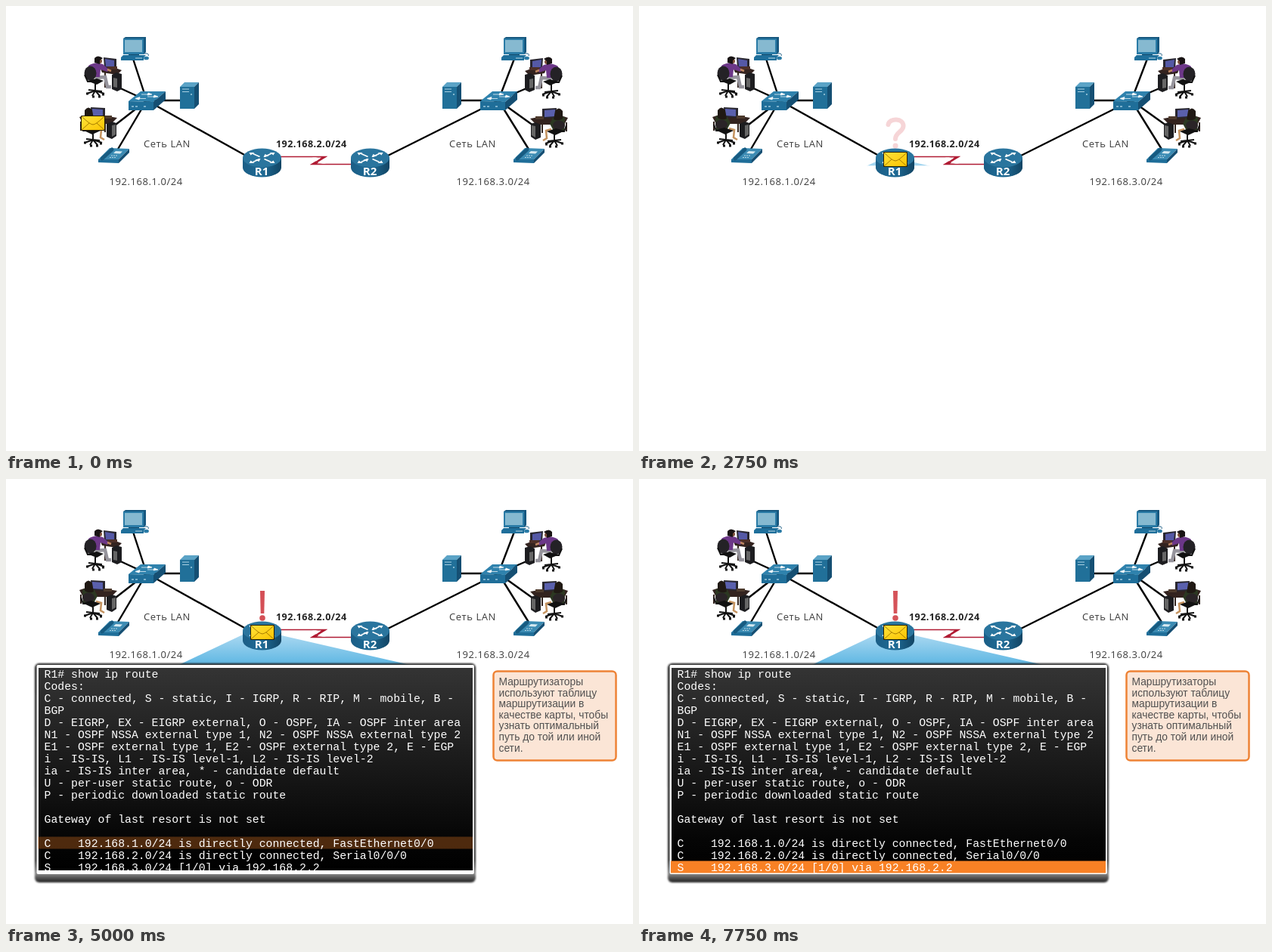
Recreate the animation shown at these times as an HTML page. Size 829x589 px, loop 8000 ms.

```html
<!DOCTYPE html>
<html lang="ru">
<head>
<meta charset="utf-8">
<title>Таблица маршрутизации</title>
<style>
  html, body { margin: 0; width: 100%; height: 100%; overflow: hidden; background: #fff; }
  svg { display: block; width: 829px; height: 589px; }
  .label { font: 13px "Open Sans", sans-serif; letter-spacing: .55px; fill: #3c3c3c; }
  .strong { font-weight: 700; font-size: 12.5px; letter-spacing: .45px; fill: #222; }
  .name { font: 700 15px "Open Sans", sans-serif; fill: #fff; text-anchor: middle; }
  .mono { font: 14.8px "Liberation Mono", monospace; fill: #fff; white-space: pre; }
  .note { font: 13.8px "Liberation Sans", sans-serif; fill: #505050; }
  .wire { stroke: #000; stroke-width: 2.4; fill: none; }
</style>
</head>
<body>
<svg viewBox="0 0 829 589">
  <defs>
    <linearGradient id="coneFill" x2="0" y2="1">
      <stop stop-color="#b9dff4"/><stop offset="1" stop-color="#4fb0e0"/>
    </linearGradient>
    <linearGradient id="screenFill" x2="0" y2="1">
      <stop stop-color="#343434"/><stop offset=".85" stop-color="#050505"/><stop offset="1"/>
    </linearGradient>
    <linearGradient id="frameFill" x2="0" y2="1">
      <stop stop-color="#222"/><stop offset=".9" stop-color="#333"/>
      <stop offset=".96" stop-color="#888"/><stop offset="1" stop-color="#1c1c1c"/>
    </linearGradient>
    <linearGradient id="sideFill">
      <stop stop-color="#1b5e86"/><stop offset=".5" stop-color="#1f6b96"/><stop offset="1" stop-color="#124564"/>
    </linearGradient>
    <linearGradient id="paperFill" x2="1" y2="1">
      <stop stop-color="#ffe23c"/><stop offset="1" stop-color="#fcc400"/>
    </linearGradient>
    <filter id="soft" x="-5%" y="-5%" width="110%" height="110%"><feGaussianBlur stdDeviation="1"/></filter>
    <clipPath id="coneClip"><rect id="coneWipe" x="200" y="190" width="380" height="64"/></clipPath>
    <clipPath id="textClip">
      <rect x="43" y="250" width="574" height="268"/>
      <rect class="band" x="42" width="575" height="16"/>
    </clipPath>

    <g id="pc">
      <path d="M155 43l3-2h27v20l-3 3h-27z" fill="#17587f"/>
      <path d="M155 43h27v21h-27z" fill="#2a7ba6"/>
      <path d="M157 45h23v16h-23z" fill="#86b9d0"/>
      <path d="M162 64h14v3h-14z" fill="#134a6b"/>
      <path d="M152 68l3-3h30l-3 3v4h-30z" fill="#1f6f9b"/>
      <path d="M171 69h9" stroke="#b8d8e6"/>
      <path d="M182 63q8-1 6 3" fill="none" stroke="#17587f"/>
      <ellipse cx="185.500" cy="69" rx="3.400" ry="2.300" fill="#2a7ba6"/>
    </g>
    <g id="server">
      <path d="M230 107l6-6h19l-6 6z" fill="#5ba3c6"/>
      <path d="M249 107l6-6v29l-6 6z" fill="#154f73"/>
      <path d="M230 107h19v29h-19z" fill="#217099"/>
      <path d="M233 110h9M233 113.500h9" stroke="#a9d0e2"/>
      <circle cx="245" cy="117" r="1" fill="#a9d0e2"/>
    </g>
    <g id="switch">
      <path d="M162 126l16-13h33l-16 14z" fill="#2f82ad"/>
      <path d="M162 126l33 1v11h-33z" fill="#1f6e99"/>
      <path d="M195 127l16-14v11l-16 14z" fill="#154f73"/>
      <path d="M179 117h10M188 115l5 2-6 1zM187 120h10M196 118l5 2-6 1zM176 122.500h9M177 120.500l-6 2 5 1.500z" stroke="#fff" stroke-width=".7" fill="#fff"/>
      <path d="M166 133h3m2 0h3m8 0h3" stroke="#9cc8dd" stroke-width="1.500"/>
    </g>
    <g id="phone">
      <path d="M122 203l15-15 26 1-14 14z" fill="#3b8bb3"/>
      <path d="M122 203l27 0v5l-27-1z" fill="#1f6e99"/>
      <path d="M149 203l14-14v5l-14 14z" fill="#154f73"/>
      <path d="M127 202l13-12" stroke="#175b81" stroke-width="5" stroke-linecap="round"/>
      <path d="M145 192l9 .5-3 3-9-.5z" fill="#d5e9f1"/>
      <path d="M139 198h9m-11 2.500h9" stroke="#b7d7e5" stroke-dasharray="2 1"/>
    </g>
    <g id="chairFoot" fill="none" stroke="#111" stroke-width="2">
      <path d="M0-10V0M-11 4L0 0 12 4M-4 7L0 0 6 7M-9-1L9 1"/>
      <path d="M-12 4h3m18 1h3m-16 3h3m5 0h3" stroke-width="3"/>
    </g>
    <g id="manDesk">
      <path d="M125 83l11-4 17 6-6 6-20-3z" fill="#33231f"/>
      <path d="M129 68l17 2v14l-16-2z" fill="#28262f"/>
      <path d="M131 70l12 2v10l-11-2z" fill="#5559a6"/>
      <path d="M134 80h13v4h-13z" fill="#4d3028"/>
      <path d="M140 91l6-3 7 2v20l-6 3-7-3z" fill="#1d1d20"/>
      <path d="M142 95l5 1v12l-5-1z" fill="#666"/>
      <path d="M131 88v20" stroke="#33251f" stroke-width="2"/>
      <path d="M118 95l13-1 3 13h5" fill="none" stroke="#96949c" stroke-width="4.500"/>
      <path d="M109 79q8-6 19-2l8 7-2 3-9-3-1 10h-14z" fill="#6c3788"/>
      <path d="M134 84l5 2" stroke="#bd8561" stroke-width="2.500"/>
      <circle cx="124" cy="73" r="3" fill="#7c4f3a"/>
      <path d="M117 75v-6q4-5 11 0l-4 3v5z" fill="#191414"/>
      <ellipse cx="111.500" cy="89" rx="8" ry="9.500" fill="#242226"/>
      <path d="M107 99l13-3 9 3-9 5z" fill="#111"/>
      <path d="M104 91l4 9h11" fill="none" stroke="#111" stroke-width="2"/>
      <use href="#chairFoot" x="118" y="112"/>
    </g>
    <g id="womanDesk">
      <path d="M97 147l15-5 35 6-8 8-37 0z" fill="#33231f"/>
      <path d="M112 134l19 1v13l-18-1z" fill="#28262f"/>
      <path d="M114 136l14 1v9l-14-1z" fill="#5a60ad"/>
      <path d="M129 145h11v4h-11z" fill="#4d3a2d"/>
      <path d="M133 156l7-3 6 2v17l-6 4-7-3z" fill="#1d1d20"/>
      <path d="M140 158l5-1v13l-5 3z" fill="#666"/>
      <path d="M99 153v12M131 154v13" stroke="#33251f" stroke-width="2"/>
      <path d="M119 162l7 2-1 10 5 3" fill="none" stroke="#c4925e" stroke-width="2.500"/>
      <path d="M101 147q8-7 16 0l4 8-5 9h-14z" fill="#2c3822"/>
      <path d="M104 148v-10q5-7 10 0l2 11q-6 3-12-1z" fill="#201914"/>
      <ellipse cx="109" cy="157" rx="8" ry="6.500" fill="#2a2427"/>
      <path d="M101 164l12-3 12 4-11 5z" fill="#111"/>
      <path d="M99 157l3 8h9" fill="none" stroke="#111" stroke-width="2"/>
      <use href="#chairFoot" x="115" y="177"/>
    </g>
    <g id="router">
      <path d="M-25.500 0v13a25.500 12.500 0 0 0 51 0V0z" fill="url(#sideFill)"/>
      <ellipse rx="25.500" ry="12.500" fill="#2a759e"/>
      <path d="M-12-5.500L-3-1.500M3 1.500L12 5.500M12-5.500L3-1.500M-3 1.500L-12 5.500" stroke="#fff" stroke-width="1.600"/>
      <path d="M-17-7h7l-5 3.500zM17 7h-7l5-3.500zM2-1l2-4 5 2.500zM-2 1l-2 4-5-2.500zM17-7h-7l5 3.500zM-17 7h7l-5-3.500z" fill="#fff"/>
    </g>
  </defs>

  <path class="wire" d="M186 125L168 70M186 125l-41-19M186 125l-41 32M186 125l-39 66M186 125h46M186 125l131 73
    M651 125L672 70M651 125l44-19M651 125l46 33M651 125l41 66M651 125h-50M651 125L505 198"/>
  <path d="M363 199.500H422L405 209.500H458" fill="none" stroke="#b01c34" stroke-width="1.700"/>
  <path d="M407 199l18 0-13 8 10 3h-20l13-8z" fill="#b01c34"/>
  <path d="M405 200.500h12l-7 5zM423 208.500h-12l6-3z" fill="#fff"/>

  <use href="#pc"/><use href="#pc" x="503"/>
  <use href="#server"/><use href="#server" x="347"/>
  <use href="#switch"/><use href="#switch" x="465"/>
  <use href="#phone"/><use href="#phone" x="549"/>
  <use href="#manDesk"/><use href="#manDesk" transform="matrix(-1 0 0 1 839 1)"/>
  <use href="#womanDesk"/><use href="#womanDesk" transform="matrix(-1 0 0 1 840 1)"/>

  <path d="M330 198L213 253.500H567L364 207z" fill="url(#coneFill)" clip-path="url(#coneClip)"/>
  <use href="#router" x="338.500" y="201"/><use href="#router" x="481.500" y="201"/>
  <text class="name" x="338" y="224">R1</text><text class="name" x="481" y="224">R2</text>

  <text class="label" x="182" y="187">Сеть LAN</text>
  <text class="label" x="586" y="187">Сеть LAN</text>
  <text class="label" x="136.500" y="237">192.168.1.0/24</text>
  <text class="label" x="595.500" y="237">192.168.3.0/24</text>
  <text class="label strong" x="357" y="187">192.168.2.0/24</text>

  <g id="question" fill="none" stroke="#d8474f" stroke-width="6" stroke-linecap="round">
    <path d="M329.500 157C331 148 350 148 349.500 159C349 167 339 167 339 176"/>
    <path d="M339 185h.1" stroke-width="7"/>
  </g>
  <g id="exclamation" fill="#d2454c">
    <path d="M336 148h6l-.7 30h-4.600z"/><circle cx="339" cy="184" r="3.800"/>
  </g>

  <g id="envelope">
    <path d="M-15.500-9.500h31v19h-31z" fill="url(#paperFill)" stroke="#2b2100"/>
    <path d="M-15-9Q-4 2 0 2T15-9M-15 9L-5 0M15 9L5 0" fill="none" stroke="#a67c00"/>
  </g>

  <g id="panel">
    <rect x="38" y="244" width="583" height="290" rx="6" fill="url(#frameFill)" filter="url(#soft)"/>
    <rect x="40.500" y="246" width="578.500" height="277" rx="2" fill="#fff"/>
    <rect x="43" y="250" width="574" height="268" fill="url(#screenFill)"/>
    <rect id="highlight" class="band" x="42" width="575" height="16" fill="#f88125"/>
    <g id="listing" clip-path="url(#textClip)"></g>
    <rect x="644.500" y="254.500" width="162" height="118" rx="5" fill="#fbe5d6" stroke="#ee8336" stroke-width="2.500"/>
    <g id="note"></g>
  </g>
</svg>
<script>
const STEP = 250, LOOP = 8000, ROW = 16;
const $ = id => document.getElementById(id);
const clamp = v => Math.max(0, Math.min(1, v));
const ramp = (t, from, to) => clamp((t - from) / (to - from));
const mix = (a, b, k) => a + (b - a) * k;

const listing = `R1# show ip route
Codes:
C - connected, S - static, I - IGRP, R - RIP, M - mobile, B -
BGP
D - EIGRP, EX - EIGRP external, O - OSPF, IA - OSPF inter area
N1 - OSPF NSSA external type 1, N2 - OSPF NSSA external type 2
E1 - OSPF external type 1, E2 - OSPF external type 2, E - EGP
i - IS-IS, L1 - IS-IS level-1, L2 - IS-IS level-2
ia - IS-IS inter area, * - candidate default
U - per-user static route, o - ODR
P - periodic downloaded static route

Gateway of last resort is not set

C    192.168.1.0/24 is directly connected, FastEthernet0/0
C    192.168.2.0/24 is directly connected, Serial0/0/0
S    192.168.3.0/24 [1/0] via 192.168.2.2`.split("\n");

const note = ["Маршрутизаторы", "используют таблицу", "маршрутизации в", "качестве карты, чтобы",
  "узнать оптимальный", "путь до той или иной", "сети."];

const lines = (texts, style, x, y, gap) => texts.map((text, i) =>
  `<text class="${style}" x="${x}" y="${y + i * gap}">${text}</text>`).join("");

$("listing").innerHTML = lines(listing, "mono", 50.5, 262.5, ROW);
$("note").innerHTML = lines(note, "note", 651.5, 273, 14.6);
const bands = document.querySelectorAll(".band");

// Host to switch, then switch to router at constant speed
const route = [[0, 115, 154.5], [600, 186, 121], [1930, 339, 202.5]];

function envelopeAt(t) {
  const i = t < route[1][0] ? 0 : 1;
  const [t0, x0, y0] = route[i], [t1, x1, y1] = route[i + 1];
  const k = ramp(t, t0, t1);
  return [mix(x0, x1, k), mix(y0, y1, k)].map(Math.round);
}

function draw(t) {
  const open = t >= 3750;
  const phase = (t + 750) % 890 / 890;
  const blink = (1 - Math.abs(1 - 2 * phase)) ** .75;
  const [x, y] = envelopeAt(t);
  $("envelope").setAttribute("transform", `translate(${x} ${y})`);
  $("question").setAttribute("opacity", t >= 2250 && !open ? blink : 0);
  $("exclamation").setAttribute("opacity", open ? blink : 0);
  $("coneWipe").setAttribute("height", 64 * ramp(t, 2500, 3250));
  $("panel").setAttribute("visibility", open ? "visible" : "hidden");
  // The highlight fades in on one row, then slides down to the next two
  const row = ramp(t, 6120, 6700) + ramp(t, 7200, 7750);
  bands.forEach(band => band.setAttribute("y", 473.5 + ROW * row));
  $("highlight").setAttribute("opacity", ramp(t, 4850, 5350));
}

function tick() {
  const t = performance.now() % LOOP;
  draw(Math.floor(t / STEP) * STEP);
  requestAnimationFrame(tick);
}
tick();
</script>
</body>
</html>
```
